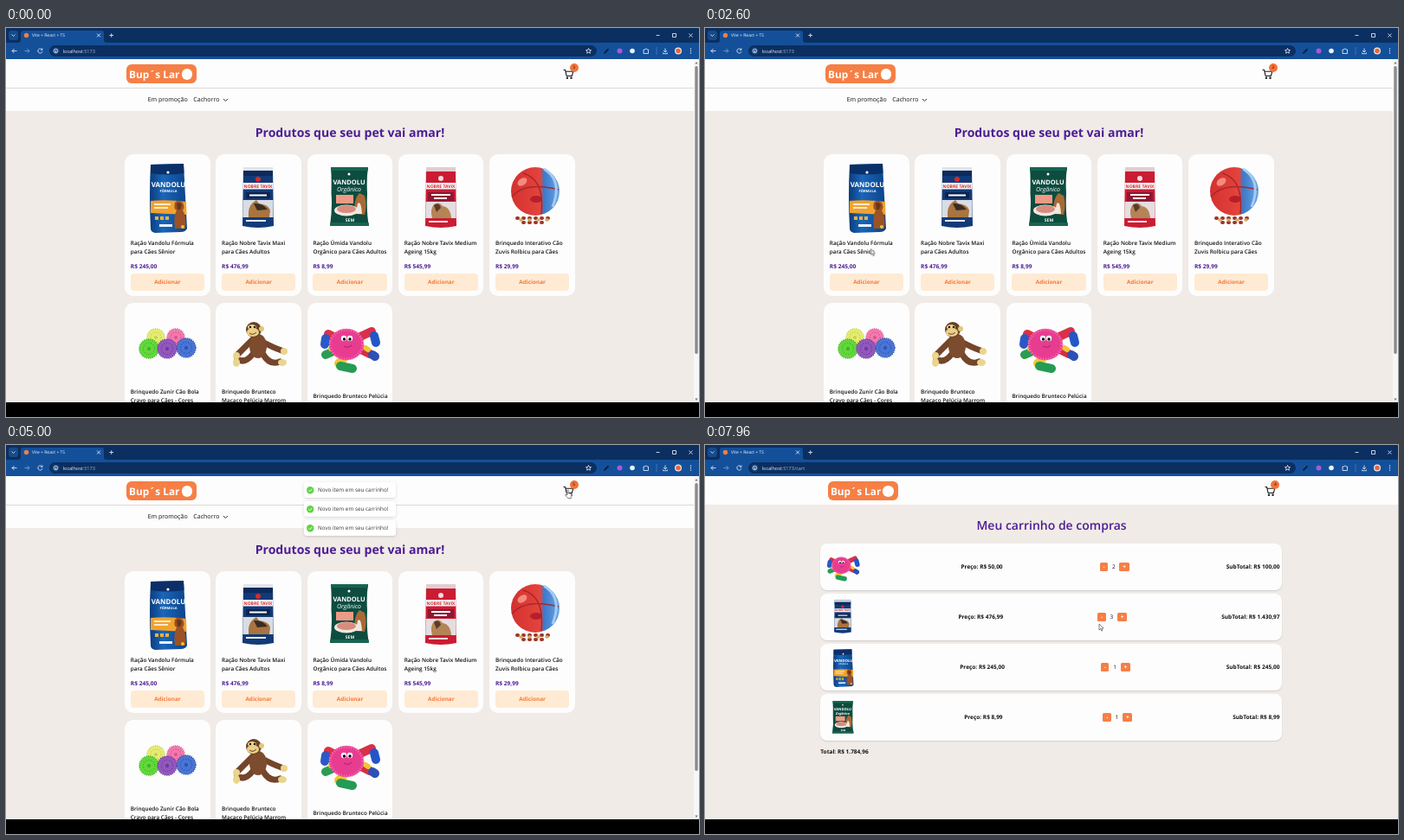
Animation, 800 px wide and 450 px high, one loop 8 s. Source, as an HTML page:

```html
<!DOCTYPE html>
<html lang="pt-BR">
<head>
<meta charset="utf-8">
<title>Loja</title>
<style>
html, body { margin: 0; width: 100%; height: 100%; overflow: hidden; background: #000; }
#stage { position: relative; width: 800px; height: 450px; overflow: hidden; background: #000;
  font-family: "Open Sans", "Noto Sans", sans-serif; text-rendering: geometricPrecision; color: #111; }
#stage div, #stage > svg, .page > svg, .head > svg, .card > svg, .toast svg { position: absolute; }
svg { display: block; overflow: visible; }
.text { line-height: 10px; white-space: pre; }
.bold { font-weight: 700; }
.semi { font-weight: 600; }
.mid { transform: translateX(-50%); }
.purple { color: #4c1d95; }
.page { left: 0; top: 0; width: 800px; height: 433px; overflow: hidden; background: #f0ebe7; }
.white { background: #fdfdfd; }
.orange { background: #f67f46; }
.card { width: 98.6px; height: 164.6px; border-radius: 10px; background: #fdfdfd; }
.add { left: 6.8px; top: 138.3px; width: 85.3px; height: 20px; border-radius: 4px; background: #ffead3;
  color: #f47a3d; font: 700 6.4px/20px "Open Sans", sans-serif; text-align: center; }
.badge { width: 10px; height: 10px; border-radius: 50%; background: #f4733a; }
.badge div { width: 10px; text-align: center; font-size: 4.8px; line-height: 10px; }
.row { left: 133.3px; width: 527.2px; height: 53.7px; padding: 0 3px; border-radius: 8px; background: #fdfdfd;
  box-shadow: 0 1px 1.5px #0002; display: flex; justify-content: space-between; align-items: center;
  font-size: 6.5px; font-weight: 700; line-height: 10px; white-space: pre; }
.qty { display: flex; align-items: center; }
.qty b { padding: 0 3.7px; border-radius: 1.6px; background: #f67f46; color: #fff; }
.qty i { font: 400 6.4px/10px "Open Sans", sans-serif; margin: 0 4.8px; }

/* page changes */
.home, .product, .cart, .n3, .n4, .n5, .arrow, .hand { animation: 8s step-end infinite; }
.home { animation-name: home; }
.product { animation-name: product; }
.cart3 { animation-name: cart3; }
.cart2 { animation-name: cart2; }
.cart1 { animation-name: cart1; }
.cart0 { animation-name: cart0; }
@keyframes home { 0% { opacity: 1 } 11% { opacity: 0 } 26% { opacity: 1 } 64%, 100% { opacity: 0 } }
@keyframes product { 0% { opacity: 0 } 11% { opacity: 1 } 26%, 100% { opacity: 0 } }
@keyframes cart3 { 0% { opacity: 0 } 64% { opacity: 1 } 85%, 100% { opacity: 0 } }
@keyframes cart2 { 0% { opacity: 0 } 85% { opacity: 1 } 88.5%, 100% { opacity: 0 } }
@keyframes cart1 { 0% { opacity: 0 } 88.5% { opacity: 1 } 92%, 100% { opacity: 0 } }
@keyframes cart0 { 0% { opacity: 0 } 92%, 100% { opacity: 1 } }
.n3 { animation-name: n3; }
.n4 { animation-name: n4; }
.n5 { animation-name: n5; }
@keyframes n3 { 0% { opacity: 1 } 38.5%, 100% { opacity: 0 } }
@keyframes n4 { 0% { opacity: 0 } 38.5% { opacity: 1 } 52%, 100% { opacity: 0 } }
@keyframes n5 { 0% { opacity: 0 } 52%, 100% { opacity: 1 } }

/* toasts: each one lives 2 s, newer ones push it down */
#toasts { left: 344px; top: 43.3px; animation: recenter 8s step-end infinite; }
@keyframes recenter { 0% { transform: none } 64%, 100% { transform: translateX(2.9px) } }
.slot { animation: 8s cubic-bezier(.21,1.02,.73,1) infinite; }
.slot:nth-child(1) { animation-name: push2; --start: 3.08s; }
.slot:nth-child(2) { animation-name: push1; --start: 3.6s; }
.slot:nth-child(3) { --start: 4.16s; }
@keyframes push2 { 0%, 45% { transform: none } 47.875%, 52% { transform: translateY(22px) }
  54.875%, 100% { transform: translateY(44px) } }
@keyframes push1 { 0%, 52% { transform: none } 54.875%, 100% { transform: translateY(22px) } }
.toast { width: 106px; height: 18.3px; border-radius: 3.3px; background: #fff; color: #363636;
  box-shadow: 0 1px 4px #0000001c, 0 1px 1.5px #0001; animation: toast 8s var(--start) infinite backwards; }
@keyframes toast {
  0% { opacity: .5; transform: translateY(-200%) scale(.6); animation-timing-function: cubic-bezier(.21,1.02,.73,1) }
  4.375%, 25% { opacity: 1; transform: none; animation-timing-function: cubic-bezier(.06,.71,.55,1) }
  30%, 100% { opacity: 0; transform: translateY(-150%) scale(.6) } }
.slot { visibility: hidden; }
.toast { visibility: visible; }
.tick { left: 3.3px; top: 4.9px; animation: pop 8s var(--start) infinite backwards; }
@keyframes pop { 0%, 1.25% { transform: scale(0); animation-timing-function: cubic-bezier(.175,.885,.32,1.275) }
  5%, 100% { transform: none } }
.tick path { stroke-dasharray: 7; animation: draw 8s var(--start) infinite backwards; }
@keyframes draw { 0%, 4% { stroke-dashoffset: 7 } 6.5%, 100% { stroke-dashoffset: 0 } }
.life { animation: life 8s var(--start) step-end infinite backwards; }
@keyframes life { 0% { opacity: 1 } 30%, 100% { opacity: 0 } }

/* pointer */
#pointer { left: 0; top: 0; animation: travel 8s ease-in-out infinite; }
@keyframes travel {
  0%, .5% { transform: translate(262px, 330px) }
  8.5%, 26% { transform: translate(190.5px, 192px) }
  32%, 33% { transform: translate(191.5px, 255.5px) }
  36.5%, 39.5% { transform: translate(187px, 294px) }
  43.5%, 45.8% { transform: translate(288px, 296px) }
  48.5%, 53% { transform: translate(385.7px, 297.3px) }
  61.5%, 66% { transform: translate(648.5px, 52px) }
  80%, 81.6% { transform: translate(463.5px, 145.5px) }
  84%, 93% { transform: translate(458px, 141px) }
  98%, 100% { transform: translate(455px, 207px) } }
.arrow { animation-name: arrow; }
.hand { animation-name: hand; }
@keyframes arrow { 0% { opacity: 0 } .5% { opacity: 1 } 6% { opacity: 0 } 11% { opacity: 1 } 35% { opacity: 0 }
  54% { opacity: 1 } 61% { opacity: 0 } 64% { opacity: 1 } 83.5% { opacity: 0 } 94%, 100% { opacity: 1 } }
@keyframes hand { 0% { opacity: 0 } 6% { opacity: 1 } 11% { opacity: 0 } 35% { opacity: 1 } 54% { opacity: 0 }
  61% { opacity: 1 } 64% { opacity: 0 } 83.5% { opacity: 1 } 94%, 100% { opacity: 0 } }
</style>
</head>
<body>
<svg width="0" height="0" style="position:absolute">
  <defs>
    <linearGradient id="blue"><stop stop-color="#0b3c7d"/><stop offset=".35" stop-color="#1a66b8"/><stop offset="1" stop-color="#0c4389"/></linearGradient>
    <linearGradient id="globe"><stop stop-color="#d3312f"/><stop offset=".6" stop-color="#e4443c"/><stop offset=".68" stop-color="#3c79c9"/><stop offset="1" stop-color="#69a6e6"/></linearGradient>
  </defs>
  <symbol id="trolley" viewBox="0 0 12 12">
    <path d="M.5 1.4H2.4L4 8.2H10L11.4 3.2H2.9" fill="none" stroke="#1b1b1b" stroke-width="1.1" stroke-linejoin="round"/>
    <circle cx="4.8" cy="10.4" r="1.2" fill="#1b1b1b"/><circle cx="9.2" cy="10.4" r="1.2" fill="#1b1b1b"/>
  </symbol>
  <symbol id="senior" viewBox="0 0 86 86">
    <path d="M23 5 61 4 65 79Q63 83 58 83L28 84Q23 83 23 79Q21 40 23 5Z" fill="url(#blue)"/>
    <path d="M23 5 61 4 61.5 15Q42 18 23 15Z" fill="#0b2f68"/>
    <g fill="#fff" font-family="Open Sans, sans-serif" font-weight="700" text-anchor="middle">
      <circle cx="43" cy="14" r="1.6"/><text x="43.5" y="31" font-size="8">VANDOLU</text><text x="43.5" y="37" font-size="4">FÓRMULA</text>
    </g>
    <path d="M23 47Q42 45 64 48L64.5 63Q44 62 23 61Z" fill="#f0a32f"/>
    <path d="M27 51H46M27 55H43" stroke="#fff" stroke-width="1.4"/>
    <path d="M51 79Q49 65 53 58Q49 56 51 49Q55 44 60 49Q63 54 60 58Q65 66 63 79Z" fill="#9a5226"/>
    <path d="M53 50Q57 47 59 52L57 57H54Z" fill="#6d3518"/>
    <path d="M28 65h4v4h-4zm6 0h4v4h-4zm6 0h4v4h-4z" fill="#e8b23c"/>
    <path d="M33 74H48V77H33Z" fill="#e9f1fa"/><circle cx="60" cy="77" r="2" fill="#f2c230"/>
  </symbol>
  <symbol id="maxi" viewBox="0 0 86 86">
    <path d="M25 8H59L60 76Q42 80 24 76Z" fill="#123a78"/>
    <path d="M25 8H59V14H25Z" fill="#dfe4ec"/><path d="M25 12H59V18H25Z" fill="#0c2a5c"/>
    <circle cx="42" cy="22" r="3" fill="#d9292f"/>
    <path d="M24.6 26H59.4V33.500H24.600Z" fill="#f5f5f5"/>
    <text x="42" y="31.6" font-size="5" font-weight="700" text-anchor="middle" fill="#d9292f" font-family="Open Sans, sans-serif">NOBRE TAVIX</text>
    <path d="M28 37H56V44H28Z" fill="#0b2450"/><path d="M32 40.500H52" stroke="#fff" stroke-width="2"/>
    <path d="M24.500 46H59.500V66H24.300Z" fill="#d8dce4"/>
    <path d="M31 66Q30 54 36 49L40 46L43 50Q54 51 56 58L55 66Z" fill="#a9743f"/><path d="M37 50Q47 49 53 57L41 58Z" fill="#382c25"/>
    <path d="M28 70H51" stroke="#eee" stroke-width="2"/>
  </symbol>
  <symbol id="medium" viewBox="0 0 86 86">
    <path d="M25 8H59L60 76Q42 80 24 76Z" fill="#ca1c33"/>
    <path d="M25 8H59V13H25Z" fill="#e2cdd1"/>
    <circle cx="42" cy="21" r="3" fill="#f5d9dc"/>
    <path d="M24.600 26H59.400V33.500H24.600Z" fill="#f5f5f5"/>
    <text x="42" y="31.6" font-size="5" font-weight="700" text-anchor="middle" fill="#d9292f" font-family="Open Sans, sans-serif">NOBRE TAVIX</text>
    <path d="M27 37H57V47H27Z" fill="#8e1732"/><path d="M31 40H53M34 44H49" stroke="#fff" stroke-width="1.800"/>
    <path d="M24.500 48H59.600V67H24.300Z" fill="#e5dde0"/>
    <path d="M32 67Q29 57 34 51Q40 47 44 53Q53 54 54 67Z" fill="#b58456"/><path d="M34 52Q40 48 42 55L37 60Z" fill="#5a3b2b"/>
    <path d="M28 71H50" stroke="#f4dada" stroke-width="2"/>
  </symbol>
  <symbol id="pouch" viewBox="0 0 86 86">
    <path d="M21 8H64Q62 22 63 38Q62 62 65 76H20Q23 55 21.500 38Q22 20 21 8Z" fill="#0d4c3f"/>
    <path d="M21 8H64V12H21ZM20.300 72H64.700V76H20Z" fill="#176451"/>
    <g fill="#fff" font-family="Open Sans, sans-serif" text-anchor="middle">
      <circle cx="42" cy="16" r="1.500"/><text x="42" y="28" font-size="7.500" font-weight="700">VANDOLU</text>
      <text x="42" y="36" font-size="7" font-style="italic">Orgânico</text><text x="43" y="71" font-size="5" font-weight="700">SEM</text>
    </g>
    <path d="M27 40H47V50H27Z" fill="#ee9a86"/>
    <path d="M49 62Q47 51 51 42L54 38L60 41Q63 52 60 63Z" fill="#a86a37"/><path d="M52 50Q56 46 57 62H50Z" fill="#f1e6da"/>
    <ellipse cx="39" cy="58" rx="14" ry="6.500" fill="#eee9e2"/><ellipse cx="39" cy="56.500" rx="11" ry="4.500" fill="#d98c7e"/>
  </symbol>
  <symbol id="ball" viewBox="0 0 86 86">
    <circle cx="46" cy="36" r="28" fill="url(#globe)"/>
    <path d="M32 15Q57 22 53 62M19 42Q35 24 73 34" fill="none" stroke="#a8262d" stroke-width="1.500"/>
    <path d="M56 10Q78 23 66 54" fill="none" stroke="#a5cbf1" stroke-width="3"/>
    <ellipse cx="31" cy="25" rx="6" ry="4" fill="#f58a7e" transform="rotate(-35 31 25)"/>
    <ellipse cx="47" cy="45" rx="7" ry="4" fill="#b5202a"/>
    <path d="M25 67H65M32 72H60" stroke="#9f3528" stroke-width="4" stroke-linecap="round" stroke-dasharray="1 6"/>
    <path d="M29 69H64" stroke="#d6aa61" stroke-width="3.500" stroke-linecap="round" stroke-dasharray="1 9"/>
  </symbol>
  <symbol id="balls" viewBox="0 0 86 86"></symbol>
  <symbol id="monkey" viewBox="0 0 86 86">
    <g fill="none" stroke="#74452a" stroke-width="7" stroke-linecap="round">
      <path d="M36 35Q27 44 19 52M47 38Q60 45 69 48M36 52Q27 64 18 58M47 51Q55 66 67 61"/></g>
    <ellipse cx="42" cy="43" rx="10" ry="14" fill="#7d4b2e"/><circle cx="37" cy="24" r="9" fill="#674027"/>
    <circle cx="46" cy="23" r="3" fill="#e2c878"/><ellipse cx="36" cy="27" rx="7" ry="5" fill="#ead189"/><ellipse cx="35" cy="21" rx="5" ry="3" fill="#ead189"/>
    <circle cx="33" cy="21" r="1.200"/><circle cx="38" cy="21" r="1.200"/><path d="M32 28Q36 31 40 27" fill="none" stroke="#6b3828"/>
    <g fill="#ead58d"><circle cx="17" cy="54" r="4"/><circle cx="72" cy="49" r="4"/><ellipse cx="17" cy="62" rx="4" ry="5"/><ellipse cx="70" cy="62" rx="5" ry="4"/></g>
  </symbol>
  <symbol id="octopus" viewBox="0 0 86 86">
    <g fill="none" stroke-width="10" stroke-linecap="round">
      <path d="M28 34 18 29" stroke="#de3045"/><path d="M15 34 14 41" stroke="#2c58c5"/>
      <path d="M24 49 15 53" stroke="#2b9d52"/><path d="M55 32 68 26" stroke="#d9304a"/>
      <path d="M71 31 73 39" stroke="#2456c6"/><path d="M56 47 66 52" stroke="#d42f43"/><path d="M69 53 72 55" stroke="#2d50b7"/>
      <path d="M36 57 30 63" stroke="#f0c72f"/><path d="M32 66 46 69" stroke="#259b55"/>
      <path d="M61 45 64 47M24 45 21 46" stroke="#efc634" stroke-width="6"/>
    </g>
    <ellipse cx="39" cy="41" rx="20" ry="18" fill="#e83c91"/>
    <ellipse cx="39" cy="41" rx="19" ry="17" fill="none" stroke="#f672b5" stroke-width="3" stroke-dasharray="1 2"/>
    <circle cx="36" cy="34" r="3.200" fill="#fff"/><circle cx="43" cy="34" r="3.200" fill="#fff"/><circle cx="36.500" cy="35" r="1.700"/><circle cx="43" cy="35" r="1.700"/>
    <path d="M36 43Q41 46 45 42" fill="none" stroke="#a9205e"/>
  </symbol>
</svg>
<div id="stage"></div>
<script>
const box = (x, y, w, h, cls, html = '', style = '') =>
  `<div class="${cls}" style="left:${x}px;top:${y}px;width:${w}px;height:${h}px;${style}">${html}</div>`;
const text = (x, y, size, str, cls = '') =>
  `<div class="text ${cls}" style="left:${x}px;top:${y - 5}px;font-size:${size}px">${str}</div>`;
const pic = (id, size, x = 0, y = 0) =>
  `<svg width="${size}" height="${size}" style="left:${x}px;top:${y}px"><use href="#${id}"/></svg>`;
const money = v => 'R$ ' + v.toLocaleString('pt-BR', { minimumFractionDigits: 2, maximumFractionDigits: 2 });

const spiky = (x, y, r, fill, edge) => `<circle cx="${x}" cy="${y}" r="${r}" fill="${fill}" stroke="${edge}" stroke-width="1.6" stroke-dasharray="1.2 1.2"/>
  <circle cx="${x}" cy="${y}" r="${r * .6}" fill="none" stroke="${edge}" stroke-width="1.4" stroke-dasharray="1.2 1.8"/>
  <circle cx="${x}" cy="${y}" r="${r * .2}" fill="${edge}"/>`;
document.getElementById('balls').innerHTML =
  spiky(29, 33, 10, '#e5ec74', '#c4d148') + spiky(52, 33, 10, '#f27aae', '#d95391') +
  spiky(21, 46, 11, '#63d83b', '#42b526') + spiky(64, 45, 11, '#4b75d4', '#2c55b5') + spiky(42, 46, 11, '#9159bd', '#713b9f');

const products = [
  ['senior', 245, 'Ração Vandolu Fórmula', 'para Cães Sênior'],
  ['maxi', 476.99, 'Ração Nobre Tavix Maxi', 'para Cães Adultos'],
  ['pouch', 8.99, 'Ração Úmida Vandolu', 'Orgânico para Cães Adultos'],
  ['medium', 545.99, 'Ração Nobre Tavix Medium', 'Ageing 15kg'],
  ['ball', 29.99, 'Brinquedo Interativo Cão', 'Zuvis Rolbicu para Cães'],
  ['balls', 39.9, 'Brinquedo Zunir Cão Bola', 'Cravo para Cães - Cores'],
  ['monkey', 59.9, 'Brinquedo Brunteco', 'Macaco Pelúcia Marrom'],
  ['octopus', 50, 'Brinquedo Brunteco Pelúcia', '']
];

const header = (count, dx) => box(0, 36, 800, 33.3, 'white') +
  box(dx, 0, 0, 0, 'head',
    box(138.7, 42, 81.5, 22, 'orange', '', 'border-radius:6px') +
    text(142, 53.5, 11.8, 'Bup´s Lar', 'bold') .replace('style="', 'style="color:#fff;') +
    box(202.5, 47, 12.5, 12.5, '', '', 'border-radius:50%;background:#fff') +
    pic('trolley', 12.4, 642.8, 46.5) + box(650.5, 41.2, 10, 10, 'badge', count));
const counter = n => `<div>${n}</div>`;

const card = ([id, price, line1, line2], i) => {
  const drop = line2 ? 0 : 5;
  return box(137 + i % 5 * 105.3, 145.5 + (i > 4) * 172, 98.6, 164.6, 'card',
    pic(id, 86, 6.8, 7.5) + text(6.8, 103.5 + drop, 6.4, line1, 'semi') + text(6.8, 113.3, 6.4, line2, 'semi') +
    text(6.8, 130, 6.6, money(price), 'bold purple') + '<div class="add">Adicionar</div>');
};

const home = `<div class="page home">${header([3, 4, 5].map(n => `<div class="n${n}">${n}</div>`).join(''), 0)}
  ${box(0, 69.2, 794, .9, '', '', 'background:#d9d9d9')}${box(0, 70, 794, 25.5, 'white')}
  ${text(163.7, 83, 7.05, 'Em promoção')}${text(216.3, 83, 7.05, 'Cachorro')}
  <svg width="800" height="433"><path d="M251 82 253.500 84.500 256 82" fill="none" stroke="#222" stroke-width=".9"/></svg>
  ${text(397, 121.5, 14.1, 'Produtos que seu pet vai amar!', 'bold purple mid')}
  ${products.map(card).join('')}
  <svg width="800" height="433"><path d="M794 36H800V433H794Z" fill="#f6f6f6"/><rect x="795.300" y="44" width="3.400" height="333" rx="1.700" fill="#8a8a8a"/>
  <path d="M795.300 41.500 797 39 798.700 41.500ZM795.300 428.500 797 431 798.700 428.500Z" fill="#777"/></svg></div>`;

const product = `<div class="page product">${header(counter(3), 2.9)}
  ${box(211, 80.3, 118.3, 120.2, 'white')}${pic('senior', 116, 211.8, 82.6)}
  ${text(400, 94.5, 9.37, 'Ração Vandolu Fórmula para Cães Sênior', 'bold')}
  ${text(400, 112, 6.25, 'Indicada para cães sênior, envelhecimento saudável, suporte diferenciado para')}
  ${text(400, 122, 6.25, 'articulações senis, saúde intestinal, minimiza o tártaro ou cálculo dentário, com a')}
  ${text(400, 132, 6.25, 'presença do hexametafostato, importante ingrediente para a saúde bucal.')}
  <span style="color:#4b4b4b">${text(400, 152.5, 8.4, money(245), 'bold')}</span>
  ${box(442, 143.8, 13.600, 13.400, 'orange', '', 'border-radius:2px')}${pic('trolley', 10, 443.6, 145.5)}
  <svg width="800" height="433"><path d="M449 147.500V151.500M447 149.500H451" stroke="#1b1b1b" stroke-width=".8"/></svg></div>`;

const cart = first => {
  const items = [[3, first], [7, 2], [1, 3], [0, 1], [2, 1]].filter(([, n]) => n);
  const total = items.reduce((sum, [p, n]) => sum + products[p][1] * n, 0);
  const rows = items.map(([p, n], i) => {
    const [id, price] = products[p];
    return `<div class="row" style="top:${114 + i * 58.15}px">${pic(id, 47)}<span>Preço: ${money(price)}</span>` +
      `<span class="qty"><b>-</b><i>${n}</i><b>+</b></span><span>SubTotal: ${money(price * n)}</span></div>`;
  });
  return `<div class="page cart cart${first}">${header(counter(items.length), 2.9)}
    ${text(400, 93.5, 14, 'Meu carrinho de compras', 'semi purple mid')}${rows.join('')}
    ${text(133.3, 122.800 + items.length * 58.15, 6.5, 'Total: ' + money(total), 'bold')}</div>`;
};

const toast = `<div class="slot"><div class="life"><div class="toast">
  <svg class="tick" width="8.400" height="8.400"><circle cx="4.200" cy="4.200" r="4.200" fill="#61d345"/>
  <path d="M2.300 4.400 3.700 5.800 6.300 2.900" fill="none" stroke="#fff" stroke-width=".9"/></svg>
  ${text(16, 9.2, 6.3, 'Novo item em seu carrinho!')}</div></div></div>`;

const path = url => `<div class="url ${url[0]}">${text(103.2, 26.5, 5.5, url[1])}</div>`;
const browser = `<svg width="800" height="36">
  <path d="M0 0H800V36H0Z" fill="#0b2f60"/><path d="M0 17H800V36H0Z" fill="#14509a"/>
  <path d="M14 17Q17 17 17 14V6Q17 3 20 3H110Q113 3 113 6V14Q113 17 116 17Z" fill="#14509a"/>
  <rect x="50" y="20" width="632" height="13" rx="6.500" fill="#0c2f60"/>
  <rect x="3" y="3" width="11" height="11" rx="3" fill="#174b8b"/>
  <circle cx="23.500" cy="8.500" r="2.700" fill="#ef7f45"/>
  <circle cx="57.500" cy="26.500" r="4" fill="#1b4880"/>
  <g fill="none" stroke="#e6eefa" stroke-width=".85">
    <path d="M6.500 7.500 8.500 9.500 10.500 7.500M105 6.500 109 10.500M109 6.500 105 10.500M119.300 8.500H124M121.700 6.200V10.800"/>
    <path d="M12.500 26.500H7M9.500 24 7 26.500 9.500 29"/><path d="M21.500 26.500H27M24.500 24 27 26.500 24.500 29" stroke="#7fa0cb"/>
    <path d="M41.500 24.800A2.600 2.600 0 1 0 42 27.200M42 23.500V25.300H40"/>
    <circle cx="57.500" cy="26.500" r="2.200"/><path d="M57.500 26V28"/>
    <path d="M672.500 23.500 673.400 25.500 675.500 25.700 673.900 27.100 674.400 29.200 672.500 28.100 670.600 29.200 671.100 27.100 669.500 25.700 671.600 25.500Z"/>
    <path d="M736 25H737.500A1.300 1.300 0 0 1 740 25H741.500V29.500H736ZM761 23.500V27.500M759 26 761 28 763 26M758.500 28.500V29.700H763.500V28.500"/>
    <path d="M750.500 8.500H754.500M769.500 6.500H773.500V10.500H769.500ZM788.500 6.500 792.500 10.500M792.500 6.500 788.500 10.500"/>
    <path d="M751 22V31" stroke="#4479b9"/>
  </g>
  <path d="M690.500 29.300 695.500 24.300" stroke="#0a1d38" stroke-width="1.800"/>
  <circle cx="708.500" cy="26.500" r="3" fill="#a45bd6"/><circle cx="723" cy="26.500" r="2.800" fill="#edf3fb"/>
  <circle cx="776" cy="26.500" r="4" fill="#f2e9e2"/><circle cx="776" cy="26.500" r="2.800" fill="#e2663d"/>
  <g fill="#e6eefa"><circle cx="790.500" cy="24" r=".7"/><circle cx="790.500" cy="26.500" r=".7"/><circle cx="790.500" cy="29" r=".7"/></g>
  </svg><span style="color:#f2f6fc">${text(30, 8.500, 5, 'Vite + React + TS')}
  ${text(65.700, 26.500, 5.500, 'localhost<span style="color:#a9bdd8">:5173</span>')}</span>
  <span style="color:#a9bdd8">${path(['product', '/product/1'])}${path(['cart cart-url', '/cart'])}</span>`;

const pointer = `<div id="pointer"><svg class="arrow" width="6" height="9" style="position:absolute">
  <path d="M0 0V7L1.600 5.500 2.800 8.100 3.900 7.600 2.700 5.100H5Z" fill="#fff" stroke="#222" stroke-width=".55"/></svg>
  <svg class="hand" width="8" height="10" style="position:absolute">
  <path d="M-.8 6V.7A.8.8 0 0 1 .8.700V3.600L3.500 4.200Q4.500 4.500 4.400 5.500L3.900 8.300V9.600H.2L-2.600 6.400Q-2.900 5.400-2 5.200Z" fill="#fff" stroke="#222" stroke-width=".6"/></svg></div>`;

document.head.insertAdjacentHTML('beforeend', `<style>.cart-url { animation-name: cartUrl; }
  @keyframes cartUrl { 0% { opacity: 0 } 64%, 100% { opacity: 1 } }</style>`);
document.getElementById('stage').innerHTML = home + product + [3, 2, 1, 0].map(cart).join('') +
  `<div id="toasts">${toast.repeat(3)}</div>` + browser + pointer;
</script>
</body>
</html>
```
